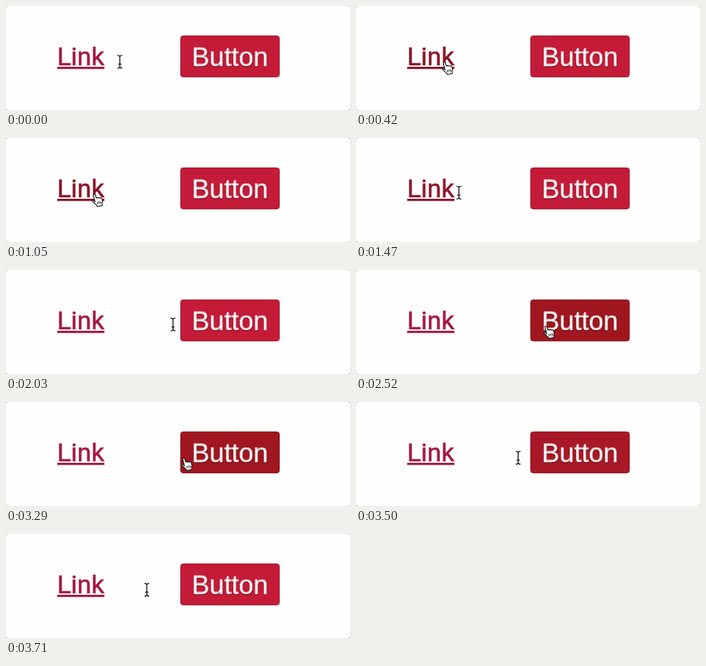
Write an HTML page that moves like this. It is 430 px wide and 130 px high and loops after 3.78 s.

```html
<!DOCTYPE html>
<html lang="en">
<head>
<meta charset="utf-8">
<title>Hover states</title>
<style>
  html, body { margin: 0; width: 100%; height: 100%; overflow: hidden; background: #aaa; }
  svg { display: block; }
  #link { font: 32px Roboto, Arial, sans-serif; stroke-width: .5; }
  #label { font: 33px "Liberation Sans", Arial, sans-serif; fill: #fff; stroke: #fff; stroke-width: .4;
    text-shadow: 0 1px 1px rgba(70, 0, 10, .55); }
</style>
</head>
<body>
<svg width="430" height="130">
  <rect width="430" height="130" rx="3" fill="#fefefe"/>
  <g id="link">
    <text x="64" y="74">Link</text>
    <path d="M64 77.4h59" stroke-width="2.8"/>
  </g>
  <rect id="button" x="218" y="37" width="124" height="52" rx="4" stroke="#400" stroke-opacity=".3"/>
  <text id="label" x="280" y="74.5" text-anchor="middle">Button</text>
  <path id="beam" d="M-3-8Q0-8 0-6Q0-8 3-8M0-6V6M-3 8Q0 8 0 6Q0 8 3 8M-2 3H2" fill="none" stroke="#222" stroke-width="1.3"/>
  <g id="hand" stroke="#111" stroke-linejoin="round">
    <path fill="#fff" d="M-.4 10L-1 2Q-1 0 0 0Q1.2 0 1.5 2L2 5.5Q3.2 4.5 4 6Q5.5 5 6.3 6.5Q8 5.5 8.7 7.5Q9.3 11 8 13L7.7 16H1.2L.8 14.3Q-1.2 12-3.2 9.3Q-4 7.8-2.8 7.4Q-1.6 7.3-.4 10Z"/>
    <path fill="none" stroke-width=".8" d="M2.4 10.3v3m2-3v3m2-3v3"/>
  </g>
</svg>
<script>
const LOOP = 3780, STEP = 70;
const LEFT = 110, RIGHT = 237, TURN = 176, EXIT = 2870, FLICK = 3710;
const $ = id => document.getElementById(id);

const mix = (a, b, p) => a + (b - a) * p;
const ramp = (t, from, to) => Math.min(1, Math.max(0, (t - from) / (to - from)));
const blend = (a, b, p) => `rgb(${a.map((v, i) => Math.round(mix(v, b[i], p)))})`;

// Glide right, speed up leaving the button, then slow down onto the link.
function pointer(t) {
  const out = ramp(t, 1150, 2430);
  const y = 70 - 2 * Math.sin(Math.PI * out);
  if (t >= EXIT && t < FLICK) return [mix(RIGHT, TURN, ramp(t, EXIT, FLICK) ** 2), y];
  if (t >= 1150 && t < EXIT) return [mix(LEFT, RIGHT, (1 - Math.cos(Math.PI * out)) / 2), y];
  const since = (t - FLICK + LOOP) % LOOP;
  return [mix(LEFT, TURN, (1 - ramp(since, 0, 770)) ** 7.5), y];
}

function draw(now) {
  const t = Math.floor(now % LOOP / STEP) * STEP;
  const [x, y] = pointer(t);
  const over = x < 123 || x >= 218;
  $('hand').setAttribute('transform', `translate(${x} ${y}) rotate(-10)`);
  $('beam').setAttribute('transform', `translate(${x} ${y - .3})`);
  $('hand').style.display = over ? '' : 'none';
  $('beam').style.display = over ? 'none' : '';

  const linkHover = ramp(t, 70, 350) - ramp(t, 1400, 1750);
  const buttonHover = ramp(t, 2100, 2450) - ramp(t, 3430, 3710);
  const linkColor = blend([164, 25, 68], [136, 22, 40], linkHover);
  $('link').setAttribute('fill', linkColor);
  $('link').setAttribute('stroke', linkColor);
  $('button').setAttribute('fill', blend([196, 27, 56], [160, 23, 32], buttonHover));
}

const start = performance.now();
function tick() {
  draw(performance.now() - start);
  requestAnimationFrame(tick);
}
tick();
</script>
</body>
</html>
```
